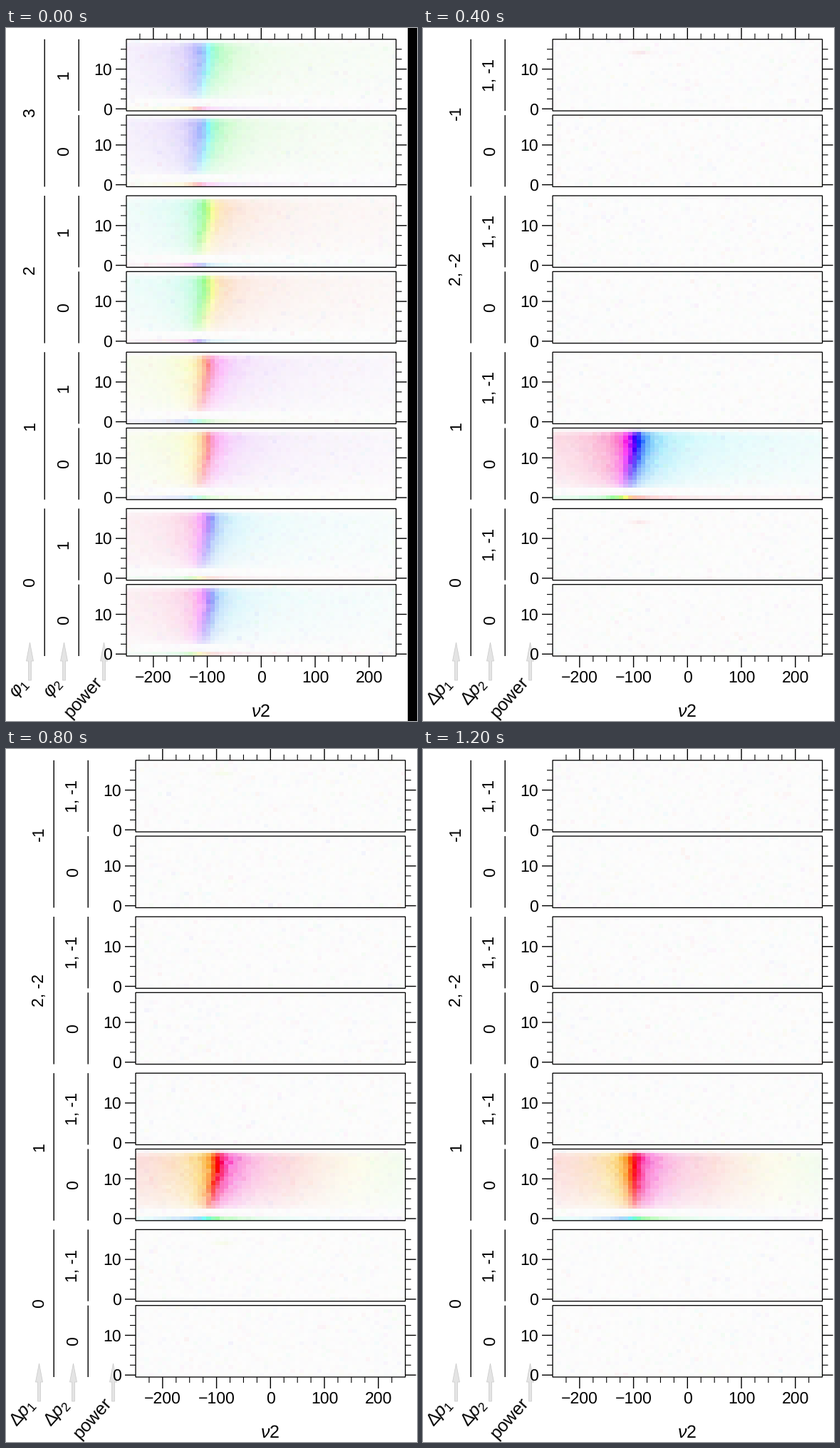
Recreate the animation shown at these times as a matplotlib script. Size 577 by 971 pixels, loop 1600 ms.

```python
import numpy as np
import matplotlib as mpl
import matplotlib.pyplot as plt
from matplotlib.animation import FuncAnimation
from matplotlib.collections import LineCollection
from matplotlib.colors import hsv_to_rgb
from matplotlib.patches import Polygon, Rectangle

W, H, DPI = 577, 971, 64
PX = 72 / DPI  # points per pixel
mpl.rcParams.update({
    "font.family": "Liberation Sans",
    "mathtext.fontset": "custom",
    "mathtext.rm": "Liberation Sans",
    "mathtext.it": "Liberation Sans:italic",
    "text.hinting": "no_hinting",
    "toolbar": "None",
})

LEFT, WIDE, TALL = 182, 378.6, 100.3
GROUP, PANEL = 219.2, 106.3
ROWS, COLS = 18, 61
TOPS = [15.8 + GROUP * g + PANEL * i for g in range(4) for i in range(2)]

GRID = np.linspace(-250, 250, COLS)[None, :]
ROW = np.arange(ROWS)[:, None]
GAMMA = 17  # resonance half width


def tint(rgb, hue, sat):
    """Multiply a colour wash into an image."""
    hue = np.broadcast_to(np.asarray(hue) % 360 / 360, rgb.shape[:2])
    pure = hsv_to_rgb(np.dstack([hue, np.ones_like(hue), np.ones_like(hue)]))
    s = np.broadcast_to(np.clip(sat, 0, 1), rgb.shape[:2])[..., None]
    return rgb * (1 - s * (1 - pure))


def resonance(rgb, rng, hue, delay=0.0, scale=1.0, bend=18):
    """Lorentzian line: phase sets the hue, magnitude the saturation."""
    d = GRID + 101 + bend * (1 - np.clip(ROW / 12, 0, 1))
    power = (np.sqrt(np.clip((ROW - 2.2) / 12, 0, 1))
             * np.clip((17.2 - ROW) / 1.6, 0, 1) + .5 * np.exp(-2.5 * ROW))
    sat = 1.05 * scale * power / np.hypot(1, d / GAMMA)
    phase = hue - .95 * np.degrees(np.arctan(d / GAMMA)) + delay * d
    phase = phase + 165 * (ROW == 0) + rng.normal(0, 2, d.shape)
    return tint(rgb, phase, sat * (1 + rng.normal(0, .07, d.shape)))


def heatmap(scene, panel):
    rng = np.random.default_rng(100 * scene + panel)
    shape = (ROWS, COLS)
    rgb = np.ones(shape + (3,)) * (.995 - .006 * rng.random(shape))[..., None]
    speck = np.clip(rng.exponential(.007, shape), 0, .04)
    rgb = tint(rgb, rng.uniform(0, 360, shape), speck)
    if scene == 0:
        rgb = resonance(rgb, rng, 262 + 95 * (3 - panel // 2), scale=.42)
    elif panel == 5:
        if scene == 1:
            rgb = resonance(rgb, rng, 262)
        else:
            rgb = resonance(rgb, rng, 0, .53, bend=18 * (scene == 2))
    elif scene < 3 and panel in (0, 6):
        trace = np.exp(-((GRID + 90) / 18) ** 2 - ((ROW - 14) / .7) ** 2)
        rgb = tint(rgb, 85 * scene - 90, .07 * trace)
    return np.clip(rgb, 0, 1)


def text(x, y, s, size=23, **kw):
    opts = dict(ha="center", va="baseline", rotation_mode="anchor")
    return ax.text(x, y, s, fontsize=size * PX, **{**opts, **kw})


def lines(segments, width):
    return ax.add_collection(LineCollection(
        segments, colors="black", linewidths=width * PX, snap=False, zorder=3))


def arrow(x):
    pts = [(x, 861), (x + 5, 887), (x + 2, 887), (x + 2, 914),
           (x - 2, 914), (x - 2, 887), (x - 5, 887)]
    return ax.add_patch(Polygon(pts, facecolor="#e4e4e4", edgecolor="#c9c9c9",
                                linewidth=.8))


def frame_art(dx, outer, inner, names):
    """Axes, labels and brackets, moved sideways by dx."""
    art, major, minor, bars = [], [], [], []
    left, right = LEFT + dx, LEFT + WIDE + dx
    for n, top in enumerate(TOPS):
        art.append(ax.add_patch(Rectangle(
            (left, top), WIDE, TALL, fill=False, edgecolor="black",
            linewidth=1.3 * PX, snap=False, zorder=3)))
        for k in range(7):
            y = top + (17.5 - 2.5 * k) / ROWS * TALL
            big = k % 4 == 0
            reach = 15 if big else 8
            (major if big else minor).extend(
                [[(left - reach, y), (left, y)], [(right, y), (right + reach, y)]])
            if big:
                art.append(text(left - 20, y + 8, str(k * 5 // 2), ha="right"))
        bars.append([(115.2 + dx, top), (115.2 + dx, top + TALL)])
        art.append(text(100.5 + dx, top + TALL / 2, inner[n % 2], rotation=90))
        if n % 2 == 0:
            bars.append([(67.2 + dx, top), (67.2 + dx, top + PANEL + TALL)])
            art.append(text(53 + dx, top + (PANEL + TALL) / 2, outer[n // 2],
                            rotation=90))

    low = TOPS[-1] + TALL
    for v in range(-225, 250, 25):
        x = left + (v + 250) / 500 * WIDE
        big = v % 100 == 0
        reach = 16 if big else 8
        (major if big else minor).extend(
            [[(x, TOPS[0] - reach), (x, TOPS[0])], [(x, low), (x, low + reach)]])
        if big:
            art.append(text(x, 917, str(v).replace("-", "\u2212")))
    art += [lines(major, 1.4), lines(minor, 1.1), lines(bars, 1.4)]

    art.append(text(370.5 + dx, 965, "$ν2$", 25))
    art += [arrow(x + dx) for x in (46.5, 94.5, 150.5)]
    for x, y, s in names:
        art.append(text(x, y, s, 25, rotation=48, va="center",
                        rotation_mode="default"))
    return art


fig = plt.figure(figsize=(W / DPI, H / DPI), dpi=DPI, facecolor="white")
ax = fig.add_axes([0, 0, 1, 1])
ax.axis("off")

maps = [[heatmap(s, p) for p in range(8)] for s in range(4)]
images = [ax.imshow(m, origin="lower", interpolation="nearest", aspect="auto",
                    extent=(LEFT, LEFT + WIDE, top + TALL, top))
          for m, top in zip(maps[0], TOPS)]
ax.set_xlim(0, W)
ax.set_ylim(H, 0)

phase_art = frame_art(-13, "3210", "10",
                      [(19, 926, "$φ_1$"), (67, 926, "$φ_2$"),
                       (109, 938, "power")])
phase_art.append(ax.add_patch(Rectangle((564, 0), 13, H, color="black", lw=0)))
order_art = frame_art(0, ["-1", "2, -2", "1", "0"], ["1, -1", "0"],
                      [(24, 931, "$Δp_1$"), (72, 931, "$Δp_2$"),
                       (122, 938, "power")])


def update(i):
    first = i == 0
    for a in phase_art:
        a.set_visible(first)
    for a in order_art:
        a.set_visible(not first)
    x = LEFT - 13 * first
    for im, data, top in zip(images, maps[i], TOPS):
        im.set_data(data)
        im.set_extent((x, x + WIDE, top + TALL, top))
    return images + phase_art + order_art


anim = FuncAnimation(fig, update, frames=4, interval=400, repeat=True,
                     repeat_delay=0, init_func=lambda: update(0))
plt.show()
```
